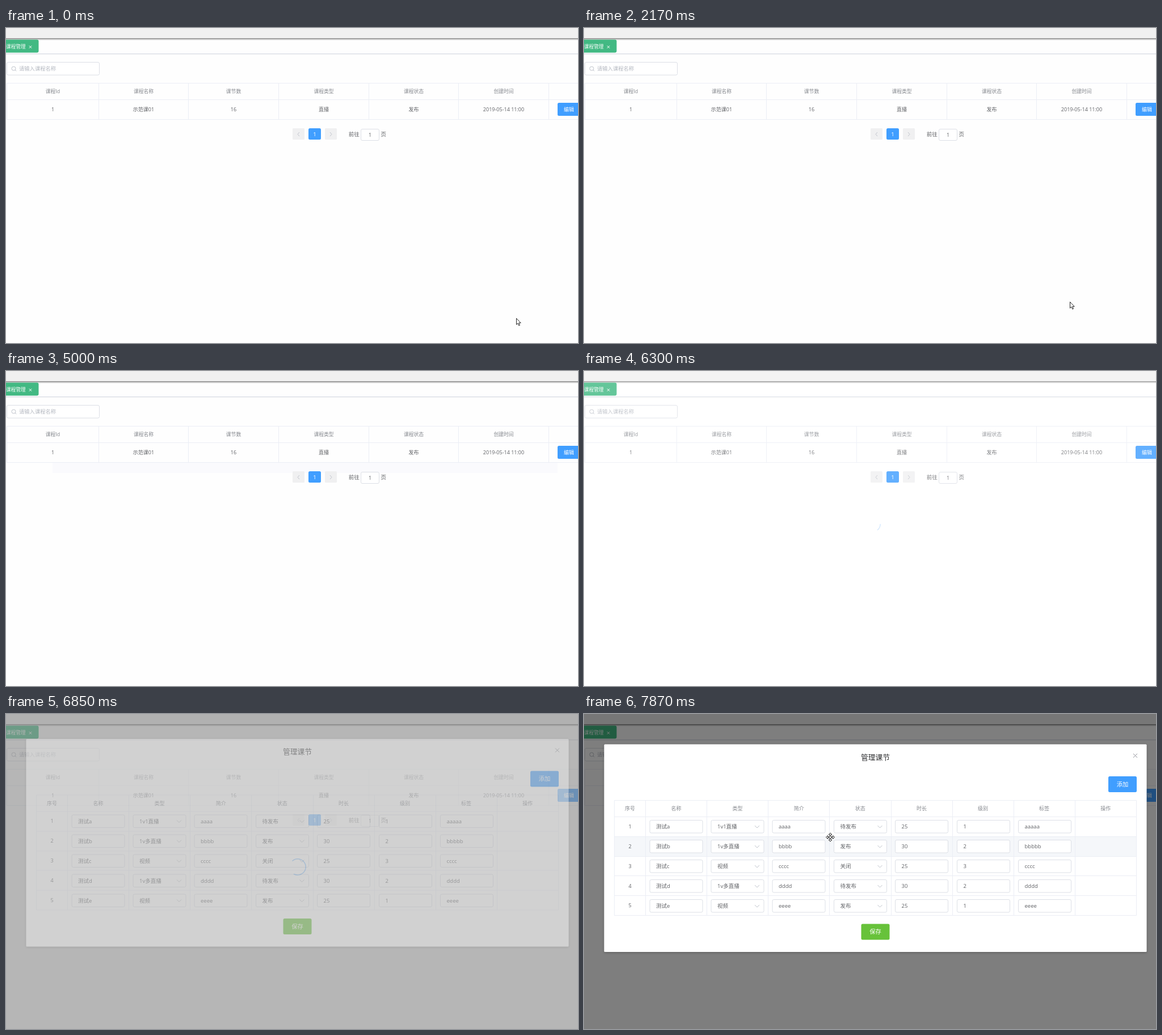
An HTML page for the animation above (7.99 s loop, 1008 px wide and 556 px high).

```html
<!DOCTYPE html>
<html lang="zh-CN">
<head>
<meta charset="utf-8">
<style>
  html, body { margin: 0; width: 100%; height: 100%; overflow: hidden; background: #fefefe; }
  svg { display: block; font-family: 'Open Sans', 'Noto Sans CJK SC', 'Noto Sans CJK', sans-serif; }
</style>
</head>
<body>
<svg id="stage" width="1008" height="556" viewBox="0 0 1008 556"></svg>
<script>
const LOOP = 7990;
const BLUE = '#409eff', GREEN = '#67c23a', INK = '#606266', HEAD = '#85888e';
const LINE = '#ebeef5', BORDER = '#dcdfe6', FAINT = '#c0c4cc';

// Drawing helpers; text is placed by its vertical centre.
const text = (s, x, y, { size = 9, fill = INK, anchor = 'middle', weight = 400 } = {}) =>
  `<text x="${x}" y="${y + size * 0.37}" font-size="${size}" fill="${fill}" text-anchor="${anchor}" font-weight="${weight}">${s}</text>`;
const rect = (x, y, w, h, fill, extra = '') =>
  `<rect x="${x}" y="${y}" width="${w}" height="${h}" fill="${fill}" ${extra}/>`;
const path = (d, stroke, extra = '') => `<path d="${d}" fill="none" stroke="${stroke}" ${extra}/>`;
const field = (x, y, w, h) => rect(x, y, w, h, '#fff', `rx="2.5" stroke="${BORDER}"`);
const button = (x, y, w, h, label, fill, size, id = '') =>
  rect(x, y, w, h, fill, `rx="2.5" ${id}`) +
  text(label, x + w / 2, y + h / 2, { size, fill: '#fff', weight: 500 });
const cross = (x, y, r, color) =>
  path(`M${x - r} ${y - r}l${2 * r} ${2 * r}m0 ${-2 * r}l${-2 * r} ${2 * r}`, color);
const grid = (xs, ys) => path(
  xs.map(x => `M${x} ${ys[0]}V${ys.at(-1)}`).join('') +
  ys.map(y => `M${xs[0]} ${y}H${xs.at(-1)}`).join(''), LINE);

function page() {
  const centers = [82.5, 242.5, 401, 560, 718.5, 877];
  const heads = ['课程Id', '课程名称', '课节数', '课程类型', '课程状态', '创建时间'];
  const cells = ['1', '示范课01', '16', '直播', '发布', '2019-05-14 11:00'];
  const left = { anchor: 'start', size: 9.5 };
  return rect(0, 0, 1008, 556, '#fefefe') +
    rect(0, 0, 1008, 18, '#f0f0f0') +
    ['#8e8e8e', '#b4b4b4', '#d9d9d9', '#f1f1f1'].map((c, i) => rect(0, 18 + i, 1008, 1, c)).join('') +
    rect(0, 45, 1008, 1, '#d8dce5') + rect(0, 46, 1008, 1, '#f2f2f4') +
    rect(-8, 20.5, 65.5, 23, '#42b983', 'rx="3"') +
    text('课程管理', 0, 32.5, { size: 8.7, fill: '#fff', anchor: 'start', weight: 500 }) +
    cross(43, 33.5, 2.2, '#fff') +
    field(1.5, 60.5, 163, 22.5) +
    `<circle cx="13.5" cy="71.5" r="3.5" fill="none" stroke="${FAINT}"/>` +
    path('M16 74l2.2 2.2', FAINT) +
    text('请输入课程名称', 23, 71.5, { size: 9.3, fill: '#b4b8c0', anchor: 'start' }) +
    grid([1.5, 163.5, 321.5, 480.5, 639.5, 797.5, 956.5, 1020], [97.5, 126.5, 161.5]) +
    heads.map((s, i) => text(s, centers[i], 112, { size: 8.8, fill: HEAD, weight: 500 })).join('') +
    cells.map((s, i) => text(s, centers[i], 143.5)).join('') +
    button(972, 132, 40, 23, '编辑', BLUE, 9, 'id="edit"') +
    rect(82, 162, 890, 18, '#fafafd', 'id="band"') +
    rect(505, 177, 21, 20, '#f0f0f1', 'rx="1.5"') + path('M517 184l-3 3.5l3 3.5', FAINT) +
    button(533, 177, 22, 20, '1', BLUE, 9.5) +
    rect(562, 177, 21, 20, '#f0f0f1', 'rx="1.5"') + path('M571 184l3 3.5l-3 3.5', FAINT) +
    text('前往', 603.7, 187.5, left) + field(625.5, 178.5, 32, 20) +
    text('1', 641.5, 188.5) + text('页', 660.5, 187.5, left);
}

const ROW = 34.9;
const fieldX = col => 116 + Math.round(col * 108.1) + 0.5 - (col < 3 ? 0.5 : 0);
const fieldY = row => 187.5 + Math.round(row * ROW);

function dialog() {
  const heads = ['序号', '名称', '类型', '简介', '状态', '时长', '级别', '标签', '操作'];
  const rows = [
    ['测试a', '1v1直播', 'aaaa', '待发布', '25', '1', 'aaaaa'],
    ['测试b', '1v多直播', 'bbbb', '发布', '30', '2', 'bbbbb'],
    ['测试c', '视频', 'cccc', '关闭', '25', '3', 'cccc'],
    ['测试d', '1v多直播', 'dddd', '待发布', '30', '2', 'dddd'],
    ['测试e', '视频', 'eeee', '发布', '25', '1', 'eeee']];
  const xs = [53.5], ys = [152.5];
  for (let i = 0; i < 9; i++) xs.push(Math.floor(108.5 + i * 108.15) + 0.5);
  for (let i = 0; i < 6; i++) ys.push(Math.floor(181.2 + i * ROW) + 0.5);
  const cell = (s, col, row) => {
    const x = fieldX(col), y = fieldY(row), isSelect = col === 1 || col === 3;
    return field(x, y, 93, 22.5) +
      text(s, x + 11, y + 11, { size: 9.5, anchor: 'start' }) +
      (isSelect ? path(`M${x + 77} ${y + 9.5}l4 4l4 -4`, FAINT) : '');
  };
  return rect(35.5, 53.5, 956, 366.5, '#fff', 'rx="1.5" filter="url(#shadow)"') +
    text('管理课节', 513.5, 76, { size: 12.8, fill: '#303133' }) +
    cross(971.5, 73.5, 3.5, '#909399') +
    button(924, 110, 50, 28, '添加', BLUE, 10.3) +
    rect(53.5, 181.5, 920, 35, '#f5f7fa', 'id="rowHover"') +
    grid(xs, ys) +
    heads.map((s, i) => text(s, i ? 54.4 + i * 108.1 : 81, 167, { fill: HEAD, weight: 500 })).join('') +
    rows.map((r, j) => text(j + 1, 81, 198.5 + j * ROW) + r.map((s, i) => cell(s, i, j)).join('')).join('') +
    rect(0, 0, 93, 22.5, 'none', `id="fieldHover" rx="2.5" stroke="${FAINT}"`) +
    button(488.5, 370.5, 50, 28, '保存', GREEN, 10.3);
}

const spokes = [0, 90, 180, 270].map(a =>
  `<path d="M-1 -2V-4.6H-2.8L0 -7.6L2.8 -4.6H1V-2" transform="rotate(${a})"/>`).join('');
const POINTERS = {
  arrow: '<path d="M.5 .5V11.5L3 9.2L4.8 13.3L6.5 12.5L4.8 8.6H8.2Z"/>',
  move: spokes + '<path d="M0 -2.4L2.4 0L0 2.4L-2.4 0Z"/>',
  beam: '<path d="M-3 -7.5H-1L0 -6.5L1 -7.5H3M0 -6.5V6.5M-3 7.5H-1L0 6.5L1 7.5H3" fill="none"/>'
};

stage.innerHTML = `
  <defs><filter id="shadow" x="-5%" y="-5%" width="110%" height="115%">
    <feDropShadow dx="0" dy="1" stdDeviation="2" flood-opacity=".3"/></filter></defs>
  ${page()}
  <g id="loader">${rect(0, 0, 1008, 556, '#fff', 'opacity=".9"')}
    <circle id="spinner" r="14.2" fill="none" stroke="${BLUE}" stroke-width="1.5" pathLength="360"/></g>
  ${rect(0, 0, 1008, 556, '#000', 'id="shade"')}
  <g id="dialog">${dialog()}</g>
  ${Object.entries(POINTERS).map(([k, d]) =>
    `<g id="${k}" fill="#fff" stroke="#111" stroke-width=".9">${d}</g>`).join('')}`;

// time, pointer kind, x, y
const pointerSteps = [
  [0, 'arrow', 899, 512], [150, 'arrow', 915, 526], [300, 'arrow', 922, 534], [425, 'arrow', 931, 545],
  [550, ''], [2170, 'arrow', 856, 483], [2320, 'arrow', 742, 382], [2470, 'arrow', 712, 345],
  [2593, 'arrow', 672, 290], [2717, 'arrow', 651, 245], [2840, 'arrow', 666, 216], [2980, 'arrow', 772, 166],
  [3130, 'arrow', 840, 146], [3250, 'arrow', 890, 132], [3400, 'arrow', 930, 116], [3520, 'arrow', 959, 102],
  [3670, 'arrow', 990, 141], [3790, 'arrow', 975, 80], [3910, 'arrow', 942, 18], [4060, 'arrow', 914, 0],
  [4180, 'arrow', 960, 12], [4300, 'arrow', 1006, 43], [4450, ''], [4700, 'arrow', 987, 166],
  [4850, 'arrow', 987, 174], [5000, ''], [7240, 'move', 919, 206], [7360, 'move', 872, 199],
  [7480, 'beam', 770, 189], [7630, 'beam', 690, 233], [7750, 'move', 545, 226], [7870, 'move', 434, 217.5]];

// time, loader opacity, arc start, arc end, shade, dialog opacity, dialog shift
const fadeSteps = [
  [0, 0, 0, 0, 0, 0, 0], [6300, 0.2, 0, 50, 0, 0, 0], [6460, 0.7, 30, 120, 0, 0, 0],
  [6580, 0.93, 90, 270, 0, 0, 0], [6730, 1, 180, 380, 0, 0, 0],
  [6850, 0.5, 228, 480, 0.285, 0.38, -9.5], [6970, 0.08, 290, 540, 0.485, 0.89, -1.5],
  [7090, 0, 0, 0, 0.5, 1, 0]];

const stepAt = (steps, t) => steps.findLast(s => s[0] <= t);
const get = id => document.getElementById(id);
const set = (id, attrs) => { for (const k in attrs) get(id).setAttribute(k, attrs[k]); };

function render(t) {
  const [, kind, x, y] = stepAt(pointerSteps, t);
  for (const k in POINTERS) set(k, { display: k === kind ? 'inline' : 'none' });
  if (kind) set(kind, { transform: `translate(${x} ${y})` });

  const [, load, from, to, shade, fade, shift] = stepAt(fadeSteps, t);
  set('loader', { opacity: load });
  set('spinner', {
    'stroke-dasharray': `${to - from} 360`,
    transform: `translate(${shade ? 514 : 508} 270) rotate(${from})`
  });
  set('shade', { opacity: shade });
  set('dialog', { opacity: fade, transform: `translate(0 ${shift})` });

  set('edit', { fill: t >= 3670 && t < 3790 ? '#66b1ff' : BLUE });
  set('band', { opacity: t >= 4700 && t < 6300 ? 1 : 0 });
  const row = t < 7630 ? 0 : 1;
  set('rowHover', { opacity: t >= 7240 ? 1 : 0, y: row ? 216.5 : 181.5 });
  set('fieldHover', { opacity: kind === 'beam' ? 1 : 0, x: fieldX(row ? 5 : 6), y: fieldY(row) });
}

function tick() {
  render(performance.now() % LOOP);
  requestAnimationFrame(tick);
}
tick();
</script>
</body>
</html>
```
